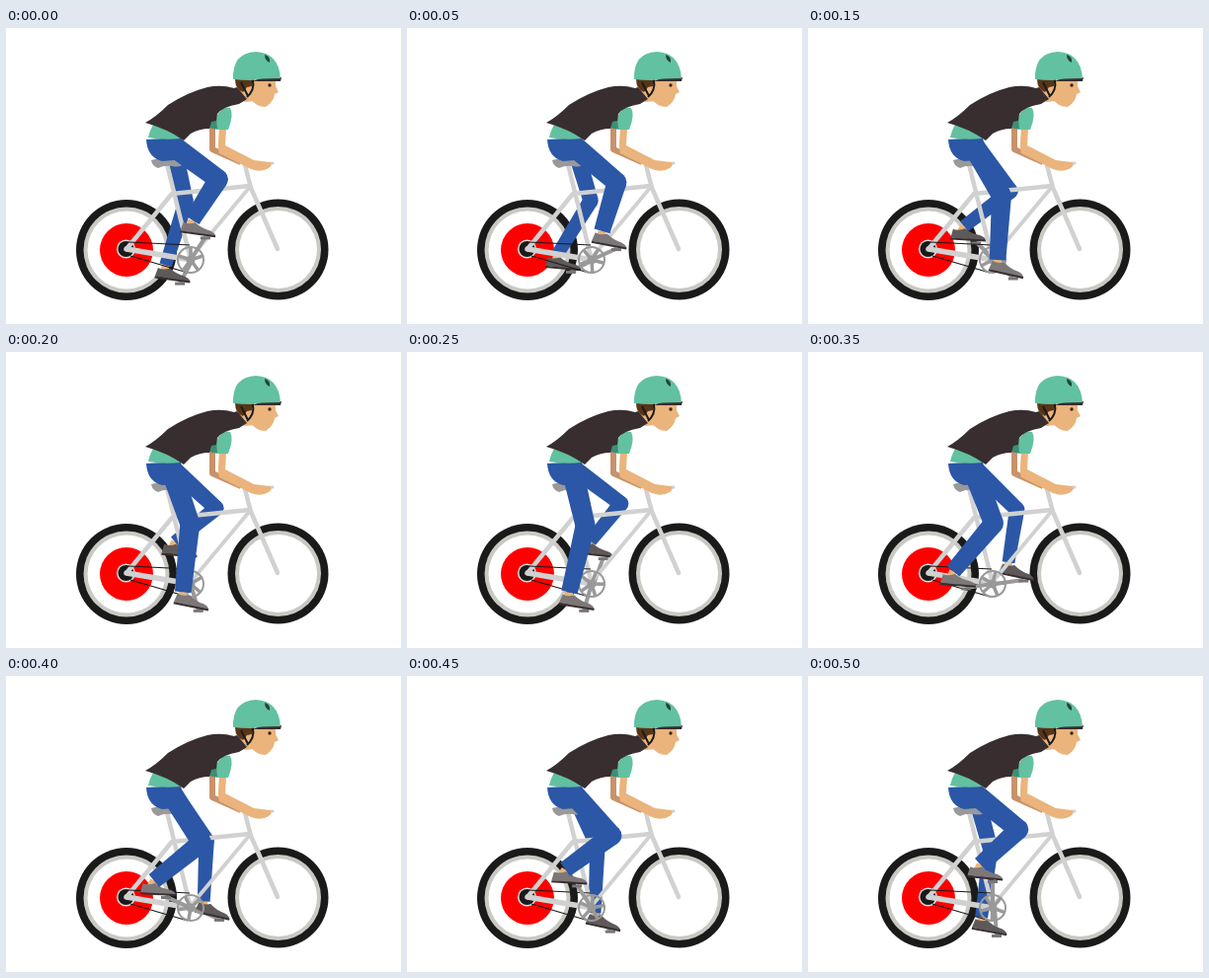
An HTML page with a canvas that plays this animation: 400x300 px, repeating every 0.55 s.

```html
<!DOCTYPE html>
<html>
<head>
<meta charset="utf-8">
<title>Cyclist</title>
<style>
html, body { margin: 0; width: 100%; height: 100%; overflow: hidden; background: #fff; }
canvas { display: block; width: 400px; height: 300px; }
</style>
</head>
<body>
<canvas id="stage" width="400" height="300"></canvas>
<script>
const ctx = document.getElementById('stage').getContext('2d');
const STEPS = 11, STEP_MS = 50, TAU = Math.PI * 2;
const BLUE = '#2b57a6', GREEN = '#62c1a0', SKIN = '#eab47c', DARK = '#382e30',
      BLACK = '#1a1a1a', TUBE = '#d1d1d1', GRAY = '#999';

function fill(d, color) {
  ctx.fillStyle = color;
  ctx.fill(new Path2D(d));
}

function line(d, color, width, cap = 'butt') {
  ctx.strokeStyle = color;
  ctx.lineWidth = width;
  ctx.lineCap = cap;
  ctx.lineJoin = 'round';
  ctx.stroke(new Path2D(d));
}

function disc(x, y, r, color) {
  ctx.beginPath();
  ctx.arc(x, y, r, 0, TAU);
  ctx.fillStyle = color;
  ctx.fill();
}

// Tapered limb between two points, wa and wb are the widths at its ends
function limb(a, wa, b, wb, color) {
  const len = Math.hypot(b.x - a.x, b.y - a.y);
  const nx = (a.y - b.y) / len / 2, ny = (b.x - a.x) / len / 2;
  fill(`M${a.x + nx * wa} ${a.y + ny * wa}L${b.x + nx * wb} ${b.y + ny * wb}
        L${b.x - nx * wb} ${b.y - ny * wb}L${a.x - nx * wa} ${a.y - ny * wa}Z`, color);
}

function wheel(x, y) {
  disc(x, y, 51, BLACK);
  disc(x, y, 43.5, '#c9c9c4');
  disc(x, y, 39.5, '#fff');
}

const wave = (step, peak) => Math.cos((step - peak) / STEPS * TAU);

function pose(step, hipX, axleX) {
  const crank = (step + 1) / STEPS * TAU;
  const thigh = (56.8 - 20.5 * wave(step, -0.1)) * Math.PI / 180;
  const tilt = (8 + 5 * wave(step, 2.7)) * Math.PI / 180;
  const hip = { x: hipX, y: 118 };
  const pedal = { x: axleX + 27.5 * Math.sin(crank), y: 235 - 27.5 * Math.cos(crank) };
  const knee = { x: hip.x + 59.5 * Math.cos(thigh), y: hip.y + 59.5 * Math.sin(thigh) };
  const ankle = { x: pedal.x - 16, y: pedal.y - 13 };
  return { hip, knee, ankle, pedal, tilt };
}

function crankArm({ pedal }, axleX) {
  line(`M${axleX} 235L${pedal.x} ${pedal.y}`, GRAY, 4);
  line(`M${pedal.x - 5} ${pedal.y + 1}h10`, '#777', 3);
}

function leg({ hip, knee, ankle, pedal, tilt }, width, shoe) {
  const len = Math.hypot(ankle.x - knee.x, ankle.y - knee.y);
  const k = 1 - 5 / len;
  const cuff = { x: knee.x + (ankle.x - knee.x) * k, y: knee.y + (ankle.y - knee.y) * k };
  limb(cuff, 8, { x: ankle.x, y: ankle.y + 4 }, 8, SKIN);
  ctx.save();
  ctx.translate(pedal.x, pedal.y);
  ctx.rotate(tilt);
  fill('M-26 -3L-24 -12Q-19 -10 -12 -13Q-5 -8 4 -7Q10 -5 10 -2Z', shoe);
  line('M-26 -2H10', DARK, 2);
  ctx.restore();
  limb(hip, width + 2, knee, width, BLUE);
  disc(knee.x, knee.y, width / 2, BLUE);
  limb(knee, width, cuff, width * 0.83, BLUE);
}

function chainring(step) {
  ctx.save();
  ctx.translate(187, 235);
  ctx.rotate(step / STEPS * TAU);
  line('M13 0A13 13 0 1 1 -13 0A13 13 0 1 1 13 0', GRAY, 2);
  for (let i = 0; i < 5; i++) {
    line('M0 0V-13', GRAY, 3.5);
    ctx.rotate(TAU / 5);
  }
  disc(0, 0, 4.5, GRAY);
  ctx.restore();
}

function bike(step) {
  line('M163 138L187 235M122 224L168 168L247 160', TUBE, 4.5, 'round');
  line('M187 233L247 161', TUBE, 3.8, 'round');
  line('M122 224L187 235', TUBE, 5.5, 'round');
  line('M242 139L248 162L275 224', TUBE, 4.5, 'round');
  line('M242 139L270 137', TUBE, 3, 'round');
  line('M124 217L186 220M126 231L184 248', BLACK, 1.2);
  chainring(step);
  fill('M147 134Q156 131 168 132L181 137Q176 142 168 140Q160 139 154 142Q148 140 147 134Z', GRAY);
}

function torso() {
  fill('M142 113L177 111L179 124L170 134L158 135Q143 131 142 113Z', BLUE);
  fill('M151 95Q146 102 144 111Q160 114 177 112L187 105Z', GREEN);
  line('M209 101L209 123L238 136', '#c8926a', 6);
  fill('M207 90L205 101L215 103L217 90Z', '#3f8d76');
  fill('M216 102L223 102L222 119L251 134L267 136Q271 138 266 142Q258 147 248 143L216 127Q214 124 216 102Z', SKIN);
  fill('M213 90Q218 79 227 81Q231 88 225 103L214 103Z', GREEN);
  fill('M234 64L244 58L252 74L241 75Z', SKIN);
  fill('M141 96Q152 90 164 78Q184 65 204 60Q218 57 231 61L234 60L244 72L236 77Q219 80 214 87L213 94L208 95L206 102Q196 102 187 107L180 114Q163 102 141 96Z', DARK);
}

function head() {
  fill('M244 52L273 52L273 59L276 65L272 67Q271 75 263 80Q253 80 247 71L241 66Z', SKIN);
  fill('M232 52L251 52L249 59L244 60L240 65Q232 62 232 52Z', '#5a3417');
  line('M250 53Q252 63 244 70M238 55L245 69', BLACK, 2);
  disc(267, 58, 1.7, '#3a2416');
  fill('M250 54L257 51L279 50L278 54Z', DARK);
  fill('M230 52Q229 25 253 24Q276 25 278 51Q256 51 248 53Q238 53 230 52Z', GREEN);
  fill('M262 27Q268 29 267 35Q262 33 262 27Z', '#24433b');
}

function draw(step) {
  const near = pose(step, 167, 187), far = pose(step + STEPS / 2, 169, 191);
  ctx.fillStyle = '#fff';
  ctx.fillRect(0, 0, 400, 300);
  wheel(122, 225);
  wheel(275.5, 224.5);
  disc(122, 225, 27, '#f00');
  disc(121.5, 224, 9.5, '#ddd');
  disc(121.5, 224, 8, BLACK);
  crankArm(far, 189);
  leg(far, 15.5, '#5f595a');
  bike(step);
  crankArm(near, 187);
  leg(near, 20, '#7d7778');
  torso();
  head();
}

// The small lead keeps rounded timestamps from falling into the previous step
function tick(now) {
  draw(Math.floor((now + 2) / STEP_MS) % STEPS);
  requestAnimationFrame(tick);
}
draw(0);
requestAnimationFrame(tick);
</script>
</body>
</html>
```
